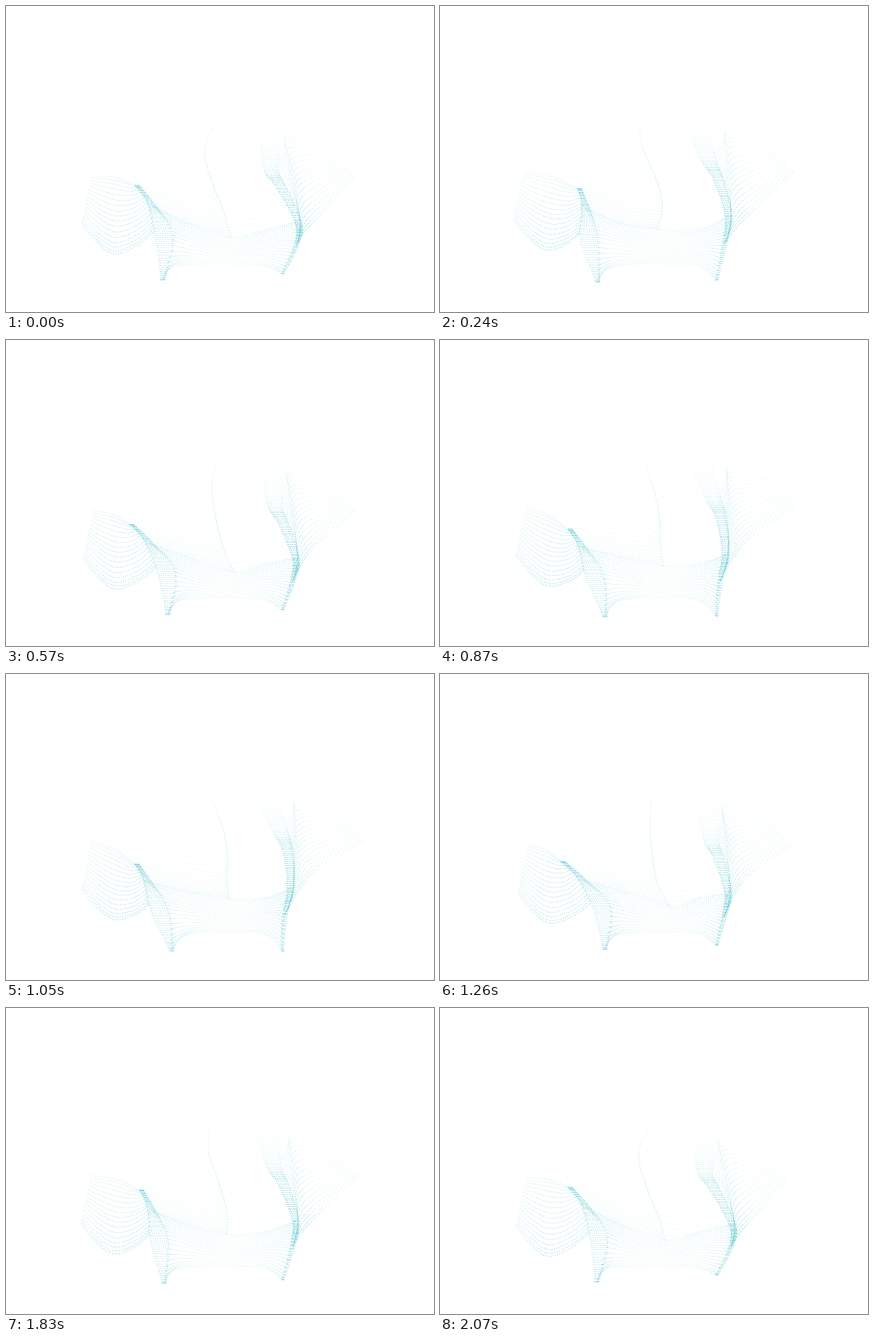
Animation of 621x445 px, one loop 2100 ms. Source, as an HTML page with a canvas:

```html
<!DOCTYPE html>
<html lang="en">
<head>
<meta charset="utf-8">
<title>Dotted wave</title>
<style>
  html, body { margin: 0; width: 100%; height: 100%; overflow: hidden; background: #fff; }
  canvas { display: block; width: 621px; height: 445px; }
</style>
</head>
<body>
<canvas id="stage" width="621" height="445"></canvas>
<script>
const ctx = document.getElementById('stage').getContext('2d');
const LOOP = 2100, STEP = 30;
const { PI, sin, cos } = Math;

const mix = (a, b, k) => a + (b - a) * k;
const mid = (p, q, k = 0.5) => [mix(p[0], q[0], k), mix(p[1], q[1], k)];
const shift = (p, x, y) => [p[0] + x, p[1] + y];
const bell = v => sin(PI * v);

// Catmull-Rom curve through the points, u from 0 to 1.
function spline(pts, u) {
  const last = pts.length - 1;
  const i = Math.min(last - 1, Math.floor(u * last)), k = u * last - i;
  const p1 = pts[i], p2 = pts[i + 1];
  const p0 = pts[Math.max(0, i - 1)], p3 = pts[Math.min(last, i + 2)];
  return [0, 1].map(c => p1[c] + 0.5 * k * (p2[c] - p0[c]
    + k * (2 * p0[c] - 5 * p1[c] + 4 * p2[c] - p3[c]
    + k * (3 * (p1[c] - p2[c]) + p3[c] - p0[c]))));
}

// Displace every point by a wave that depends on its place v along the curve.
const sway = (pts, dx, dy) => pts.map((p, i) => {
  const v = i / (pts.length - 1);
  return shift(p, dx(v), dy(v));
});

// One side of a ribbon whose half width varies along its spine.
const edge = (spine, half, side) => Array.from({ length: 9 }, (_, i) =>
  shift(spline(spine, i / 8), side * half(i / 8), 0));

// Dotted strands spread across a few guide curves.
function sheet(guides, strands, dots, alpha) {
  for (let j = 0; j <= dots; j++) {
    const v = j / dots;
    const across = guides.map(g => spline(g, v));
    for (let i = 0; i < strands; i++) {
      const s = strands > 1 ? i / (strands - 1) : 0;
      const p = across.length > 1 ? spline(across, s) : across[0];
      ctx.globalAlpha = Math.max(0, alpha(s, v));
      ctx.fillRect(Math.round(p[0]), Math.round(p[1]), 1, 1);
    }
  }
}

function draw(t) {
  const turn = 2 * PI * t / LOOP;
  const swing = (1 - cos(3 * turn + 0.2 * PI)) / 2;   // three quick beats
  const drift = (1 - cos(turn)) / 2;                  // one slow twist

  const left = sway([[188, 260], [212, 290], [231, 337], [227, 398]],
    v => 16 * swing * cos(1.5 * PI * v) - 13 * drift * cos(PI * v),
    v => 3 * swing + drift * (2 + 11 * (1 - v)));
  const right = sway([[391, 172], [382, 231], [398, 264], [424, 314], [422, 347], [401, 388]],
    v => swing * (9 * sin(2 * PI * v) - 22 * (1 - v) ** 6) + 11 * drift * sin(2 * PI * v),
    v => swing * (26 * v ** 3 - 16) + 6 * drift);
  const ridge = sway([[300, 177], [287, 215], [299, 261], [316, 302], [327, 337]],
    v => swing * (28 * bell(v) - 13) + drift * (8 + 10 * sin(2 * PI * v)),
    v => 2 * drift - 14 * swing * v);

  const leftHalf = v => 3 + 10 * bell(v ** 1.6) ** 2;
  const rightHalf = v => 2 + 17 * (1 - v) ** 3 + 2 * bell(v);
  const a = edge(left, leftHalf, 1), b = edge(left, leftHalf, -1);
  const c = edge(right, rightHalf, -1), d = edge(right, rightHalf, 1);
  const foot = left[3], heel = right[5];

  ctx.globalAlpha = 1;
  ctx.fillStyle = '#fff';
  ctx.fillRect(0, 0, 621, 445);
  ctx.fillStyle = '#22aebd';

  // faint back sheets and ridge
  sheet([[[172, 216], [245, 230], ridge[1], ridge[2]],
    [left[0], mid(left[1], ridge[2], 0.4), ridge[3]],
    [left[1], [265, 316], ridge[4]]],
    18, 42, (s, v) => 0.04 + 0.1 * s + 0.07 * s * v);
  sheet([[shift(ridge[2], 28, -6), [368, 285], right[2]],
    [ridge[4], [368, 328], right[3]]],
    10, 32, s => 0.03 + 0.06 * s);
  sheet([ridge], 1, 75, (s, v) => 0.08 + 0.22 * bell(v));

  // centre sheet
  sheet([
    [left[1], [265, 316], ridge[4], [375, 325], right[3]],
    [spline(a, 0.62), [285, 347], [330, 355], [375, 347], right[4]],
    [foot, shift(foot, 13, -19), [275, 376], [325, 375], [375, 378], heel]
  ], 20, 68, (s, v) => 0.12 + 0.26 * Math.abs(2 * v - 1) ** 2);

  // left wing
  const outer = p => shift(p, -4 * swing + 3 * drift, -7 * swing + 2 * drift);
  const tip = outer([110, 317]), valley = outer([158, 361]), top = outer([125, 247]);
  const hem = spline(b, 0.6);
  const upper = [top, shift(mid(top, b[0]), 4, -4), b[0]];
  const lower = [tip, shift(mid(tip, valley), -2, 5), valley,
    shift(mid(valley, hem, 0.6), 0, 6), hem];
  const middle = lower.map((p, i) => mid(spline(upper, i / 4), p));
  middle[4] = spline(b, 0.3);
  sheet([upper, middle, lower], 17, 46,
    (s, v) => (0.16 + 0.34 * s) * (0.25 + 0.75 * bell(0.1 + 0.65 * v)));

  // right wing
  const far = p => shift(p, 11 * swing + 5 * drift, -9 * swing);
  const rTip = far([503, 250]), rTop = far([460, 206]), hump = far([407, 191]);
  const belly = shift(mid(right[4], rTip), -7 - 6 * drift, 5 - 15 * drift);
  const root = spline(d, 0.2);
  const crest = [root, mid(root, hump, 0.65), hump, rTop];
  const base = [right[4], shift(mid(right[4], belly), -4, 1), belly, rTip];
  const body = crest.map((p, i) => mid(p, base[i]));
  body[0] = spline(d, 0.58);
  sheet([crest, body, base], 19, 48,
    (s, v) => (0.1 + 0.38 * s) * (1 - 0.7 * v ** 1.5));

  // folds
  sheet([a, b], 10, 58, (s, v) => 0.26 + 0.14 * bell(v));
  sheet([c, d], 10, 92, (s, v) => 0.03 + 0.14 * v + 0.36 * bell(v) ** 1.5);
}

function frame() {
  const t = performance.now() % LOOP;
  draw(Math.floor(t / STEP) * STEP);
  requestAnimationFrame(frame);
}
frame();
</script>
</body>
</html>
```
